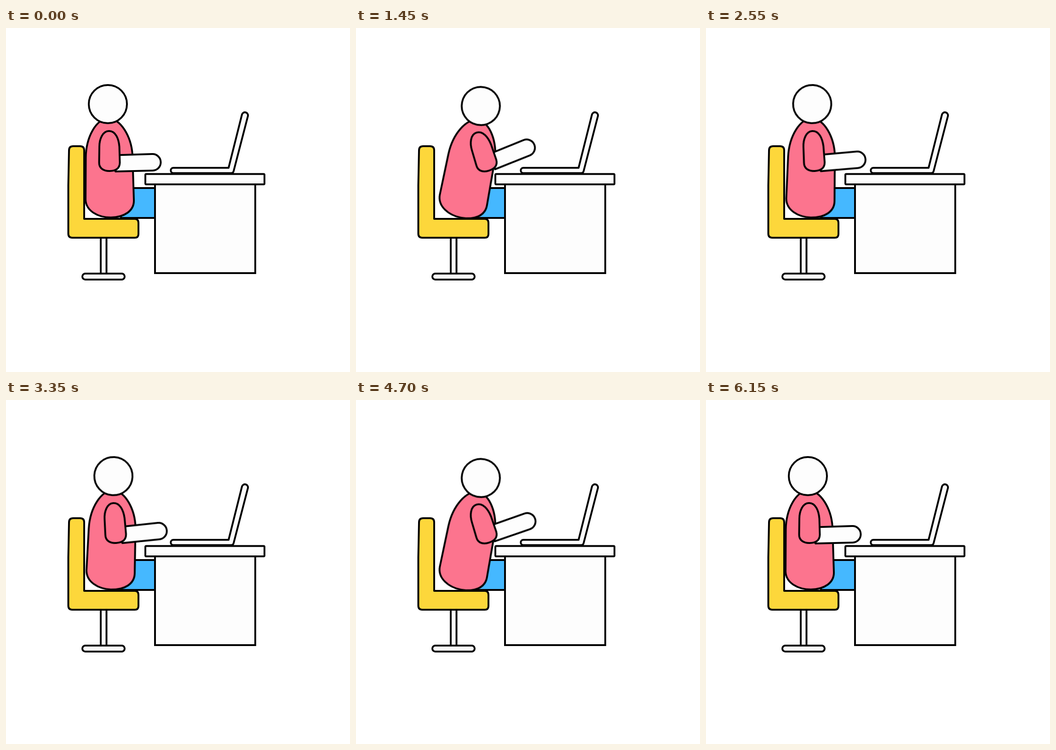
Recreate the animation shown at these times as an HTML page. Size 748 px wide and 748 px high, loop 6.2 s.

```html
<!DOCTYPE html>
<html lang="en">
<head>
<meta charset="utf-8">
<title>Person at a desk</title>
<style>
  html, body { margin: 0; width: 100%; height: 100%; overflow: hidden; background: #fff; }
  svg { display: block; width: 100vw; height: 100vh; }
  svg * { transform-box: view-box; }
  .ink { fill: #fdfdfd; stroke: #000; stroke-width: 4; stroke-linejoin: round; }
  .yellow { fill: #fdd73b; }
  .pink { fill: #fc748e; }
  .blue { fill: #45b8ff; }

  .lean, .arm, .reach, .forearm, .tap { animation: 3100ms infinite; }
  .lean { transform-origin: 226px 413px; animation-name: lean; }
  .arm, .reach { transform-origin: 224px 224px; }
  .arm { animation-name: arm; }
  .reach { animation-name: reach; }
  .forearm, .tap { transform-origin: 240px 294px; }
  .forearm { animation-name: forearm; }
  .tap { animation-name: tap; animation-timing-function: ease-in-out; }

  /* Lean in, type, lean back; the arm parts share the same timing. */
  @keyframes lean {
    0%, 3%, 96.5%, 100% { transform: rotate(0deg); }
    32%, 67.5% { transform: rotate(11.6deg); }
  }
  @keyframes arm {
    0%, 3%, 96.5%, 100% { transform: rotate(0deg); }
    32%, 67.5% { transform: rotate(-26.6deg); }
  }
  @keyframes forearm {
    0%, 3%, 96.5%, 100% { transform: rotate(0deg); }
    32%, 67.5% { transform: rotate(-3deg); }
  }
  @keyframes reach {
    0%, 29%, 71%, 100% { transform: rotate(0deg); }
    42%, 62% { transform: rotate(-2.3deg); }
  }
  @keyframes tap {
    0%, 37.1%, 46.77%, 56.45%, 66.13%, 100% { transform: rotate(0deg); }
    41.94%, 51.61%, 61.29% { transform: rotate(2.7deg); }
  }
</style>
</head>
<body>
<svg viewBox="0 0 748 748">
  <g class="ink">
    <rect x="206" y="454" width="12.5" height="80"/>
    <rect x="166" y="534" width="92" height="13" rx="6.5"/>
    <path class="yellow" d="M137 266Q137 257 146 257H161Q170 257 170 266V415H280Q288 415 288 424V448Q288 456 280 456H144Q135.500 456 135.500 447V342Z"/>
    <rect class="blue" x="250" y="348" width="74" height="65"/>

    <g class="lean">
      <path class="pink" d="M222 197C197 197 174 236 173.500 282L173 373C174 398 200 412 228 412C256 412 279 398 278 374L275 275C272 236 250 197 222 197Z"/>
      <circle cx="221.500" cy="165.500" r="41.500"/>
      <g class="arm"><g class="reach">
        <g class="forearm"><g class="tap">
          <path d="M238 276.500L318 274A18 18 0 0 1 319 310L238 312Z"/>
        </g></g>
        <path class="pink" d="M224 224C210 224 203 242 203 258L202.500 292C202 305 212 311 225 311C240 311 247 305 247.500 293L246.500 258C245 240 238 224 224 224Z"/>
      </g></g>
    </g>

    <rect x="324" y="340" width="218" height="193" stroke-linejoin="miter"/>
    <rect x="303" y="317.500" width="259" height="22.500" rx="2"/>
    <path d="M364 304H484L513 188.500A6.600 6.600 0 0 1 526 191.500L495 311Q494 315.500 490 315.500H364A5.750 5.750 0 0 1 364 304Z"/>
  </g>
</svg>
</body>
</html>
```
